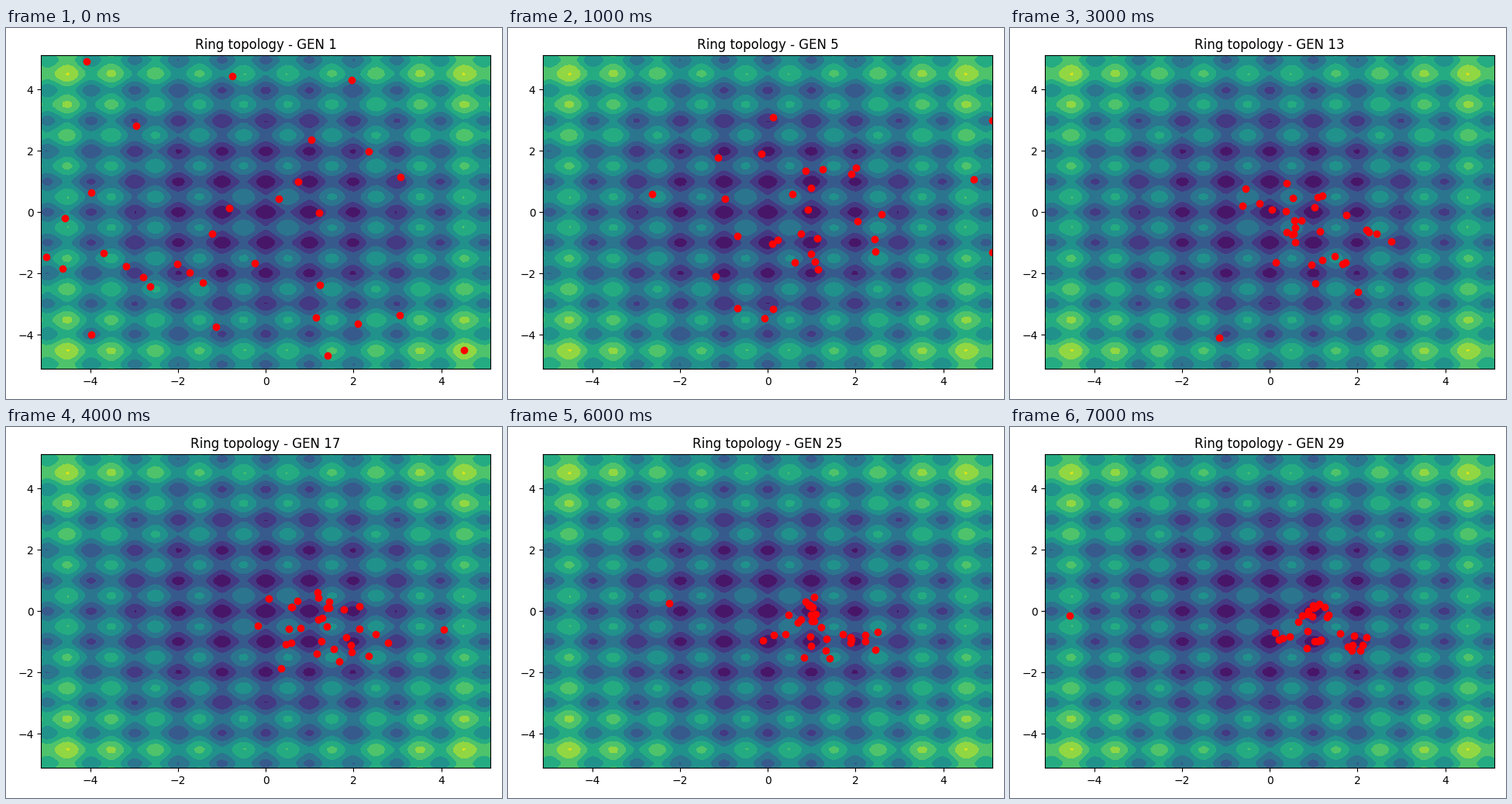
Recreate the animation shown at these times as a matplotlib script. Size 640x478 px, loop 8 s.

```python
import numpy as np
import matplotlib.pyplot as plt
from matplotlib.animation import FuncAnimation

W, H, DPI = 640, 478, 100
LIMIT = 5.12
STEPS = 8

# Minima the swarm settles into, and how many particles each one draws
MINIMA = [(1, 0), (2, -1), (1, -1), (0.2, -0.7)]
SHARES = [13, 8, 6, 4]
# One particle per step that wanders away from the rest
STRAYS = [(-5, -1.45), (LIMIT, 3), (-2.5, 3.5), (-1.15, -4.1),
          (4.05, -0.6), (2.7, 4), (-2.25, 0.25), (-4.55, -0.15)]


def rastrigin(x, y):
    return 20 + x**2 + y**2 - 10 * np.cos(2 * np.pi * x) - 10 * np.cos(2 * np.pi * y)


def title(step):
    return f"Ring topology - GEN {1 + 4 * step}"


def swarm(step):
    """Uniform at first, then scattered ever closer around the minima."""
    rng = np.random.default_rng(40 + step)
    homes = np.repeat(np.array(MINIMA, float), SHARES, axis=0)
    if step == 0:
        points = rng.uniform(-LIMIT, LIMIT, homes.shape)
    else:
        spread = 2.3 * np.exp(-0.36 * step)
        points = homes + rng.normal(0, spread, homes.shape)
    return np.clip(np.vstack([points, STRAYS[step]]), -LIMIT, LIMIT)


fig, ax = plt.subplots(figsize=(W / DPI, H / DPI), dpi=DPI)
fig.subplots_adjust(left=45.2 / W, right=625.1 / W, top=1 - 35.3 / H, bottom=1 - 439.3 / H)
axis = np.linspace(-LIMIT, LIMIT, 100)
X, Y = np.meshgrid(axis, axis)
ax.contourf(X, Y, rastrigin(X, Y), levels=np.arange(0, 91, 10), cmap="viridis")
dots = ax.scatter([], [], s=36, c="red")
ax.set(xlim=(-LIMIT, LIMIT), ylim=(-LIMIT, LIMIT))


def update(step):
    dots.set_offsets(swarm(step))
    ax.set_title(title(step))
    return dots,


anim = FuncAnimation(fig, update, frames=STEPS, interval=1000, repeat=True)
plt.show()
```
